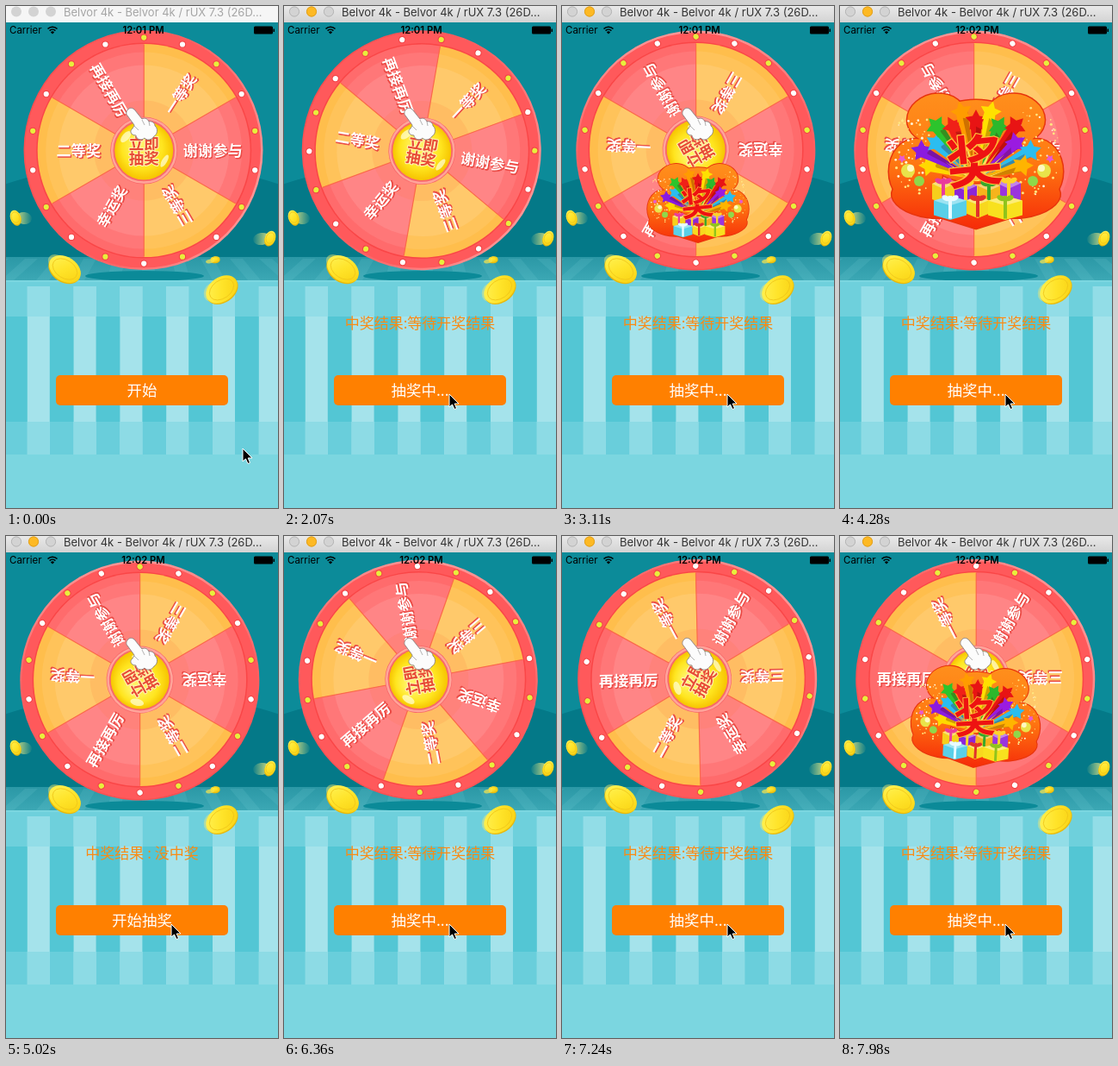
Animation, 316 px wide and 582 px high, one loop 8 s. Source, as an HTML page with a canvas:

```html
<!DOCTYPE html>
<html lang="zh">
<head>
<meta charset="utf-8">
<title>幸运转盘</title>
<style>
  html, body { margin: 0; width: 100%; height: 100%; overflow: hidden; }
  canvas { display: block; }
</style>
</head>
<body>
<canvas id="stage" width="316" height="582"></canvas>
<script>
const c = document.getElementById('stage').getContext('2d');
const TAU = Math.PI * 2, RAD = Math.PI / 180, LOOP = 8000;
const CJK = '"Noto Sans CJK SC", "Noto Sans CJK", sans-serif';

// Bursts of change: first step, last step, number of steps
const BURSTS = [[150, 880, 6], [2070, 3110, 8], [3260, 4280, 8],
  [4420, 5020, 5], [6360, 7390, 8], [7540, 7980, 4]];

function snap(t) {
  let s = 0;
  for (const [a, b, n] of BURSTS)
    for (let i = 0; i < n; i++) {
      const x = a + (b - a) * i / (n - 1);
      if (x <= t + 3) s = x;
    }
  return s;
}

const clamp = x => Math.max(0, Math.min(1, x));

// Ease-in-out, cubic-bezier(.42, 0, .58, 1)
function ease(x) {
  let lo = 0, hi = 1;
  for (let i = 0; i < 24; i++) {
    const u = (lo + hi) / 2, v = 1 - u;
    if (1.26 * v * v * u + 1.74 * v * u * u + u * u * u < x) lo = u; else hi = u;
  }
  return lo * lo * (3 - 2 * lo);
}

function rect(x, y, w, h, fill) { c.fillStyle = fill; c.fillRect(x, y, w, h); }

function oval(x, y, rx, ry, fill, rot = 0) {
  c.beginPath();
  c.ellipse(x, y, rx, ry, rot * RAD, 0, TAU);
  c.fillStyle = fill;
  c.fill();
}

const disc = (x, y, r, fill) => oval(x, y, r, r, fill);

function ring(x, y, r, width, stroke) {
  c.beginPath();
  c.arc(x, y, r, 0, TAU);
  c.lineWidth = width;
  c.strokeStyle = stroke;
  c.stroke();
}

function poly(pts, fill) {
  c.beginPath();
  for (let i = 0; i < pts.length; i += 2) c.lineTo(pts[i], pts[i + 1]);
  c.closePath();
  c.fillStyle = fill;
  c.fill();
}

function text(s, x, y, font, fill, align = 'center') {
  c.font = font;
  c.textAlign = align;
  c.textBaseline = 'alphabetic';
  c.fillStyle = fill;
  c.fillText(s, x, y);
}

function at(x, y, deg, draw, scale = 1) {
  c.save();
  c.translate(x, y);
  c.rotate(deg * RAD);
  c.scale(scale, scale);
  draw();
  c.restore();
}

function linear(x0, y0, x1, y1, ...stops) {
  const g = c.createLinearGradient(x0, y0, x1, y1);
  stops.forEach((s, i) => g.addColorStop(i / (stops.length - 1), s));
  return g;
}

function coin(x, y, rx, ry, deg) {
  at(x, y, deg, () => {
    oval(0, 1.5, rx, ry, '#e8b90c');
    oval(0, 0, rx, ry, linear(-rx, -ry, rx, ry, '#fff45c', '#ffe42a', '#f8cf10'));
    c.beginPath();
    c.ellipse(0, 0, rx * .78, ry * .75, 0, 0, TAU);
    c.lineWidth = .8;
    c.strokeStyle = '#f0c61a';
    c.stroke();
  });
}

function backdrop() {
  rect(0, 19, 316, 300, '#0c8b99');
  c.save();
  c.beginPath();
  c.rect(0, 19, 316, 273);
  c.clip();
  oval(158, 300, 260, 118, '#047988');
  c.restore();

  // Floor with converging boards
  rect(0, 291, 316, 28, linear(0, 291, 0, 319, '#2b98a6', '#3ca8b5'));
  for (let i = -8; i < 9; i++) {
    const x = 158 + i * 34;
    poly([x, 293, x + 15, 293, x + 15 + i * 7, 318, x + i * 7, 318], 'rgba(130,210,220,.14)');
  }
  oval(161, 313, 69, 6, '#0b8a98');

  // Fence
  rect(0, 318, 316, 264, '#7bd6e0');
  rect(0, 320, 316, 40, '#6ed0dc');
  rect(0, 360, 316, 122, '#53c6d4');
  rect(0, 482, 316, 38, '#69cedb');
  for (let i = 0; i < 6; i++) {
    const x = 24.8 + i * 53.8;
    rect(x, 325, 26, 195, '#a5e3eb');
    rect(x, 325, 26, 35, '#92dde7');
    rect(x, 482, 26, 38, '#8ddbe5');
  }

  // Coins with faint trails
  oval(21, 246, 9, 7, linear(12, 0, 31, 0, 'rgba(250,240,130,.8)', 'rgba(250,240,130,0)'), 8);
  coin(11, 245, 6, 8.5, -20);
  oval(297, 270, 10, 7, linear(305, 0, 286, 0, 'rgba(250,240,130,.8)', 'rgba(250,240,130,0)'), -8);
  coin(307, 269, 6, 8.5, 22);
  coin(243, 293.5, 5.5, 3.3, -5);
  oval(237, 296, 5, 2.2, 'rgba(240,225,80,.75)', -10);
  oval(60, 298, 12, 9, 'rgba(245,232,110,.45)', 35);
  oval(239, 332, 9, 11, 'rgba(245,232,110,.45)', 20);
  coin(68.5, 305, 20, 14, 33);
  coin(250.5, 328.5, 20, 14, -35);
}

// Label, direction, radius, text angle
const PRIZES = [['一等奖', -57, 78, -57], ['谢谢参与', 0, 80, 0], ['三等奖', 59, 75, 240],
  ['幸运奖', 120, 75, -60], ['二等奖', 180, 76, 0], ['再接再厉', 240, 81, 60]];

function label(s, y, size, fill, edge, shift = 0, width = 1.2) {
  const font = `bold ${size}px ${CJK}`;
  c.font = font;
  c.textAlign = 'center';
  c.lineJoin = 'round';
  c.lineWidth = width;
  c.strokeStyle = edge;
  c.strokeText(s, shift, y + shift);
  if (shift) text(s, shift, y + shift, font, edge);
  text(s, 0, y, font, fill);
}

function wheel(deg) {
  at(157.6, 168.4, deg, () => {
    c.translate(2.6, -.8);
    disc(-.7, -.7, 139, linear(-139, -60, 139, 60, '#f94d4f', '#fd6163', '#ff9a9a'));
    disc(-1.2, -1, 137, '#ff595b');
    disc(0, 0, 125, '#fa4647');
    const edge = i => (i * 60 - 90) * RAD;
    for (let i = 0; i < 6; i++) {
      c.beginPath();
      c.moveTo(0, 0);
      c.arc(0, 0, 123.5, edge(i), edge(i + 1));
      c.fillStyle = i % 2 ? '#ff6b6c' : '#ffbe4c';
      c.fill();
    }
    disc(0, 0, 114, 'rgba(255,255,255,.08)');
    disc(0, 0, 99, 'rgba(255,255,255,.1)');
    disc(0, 0, 58, 'rgba(255,110,50,.13)');
    c.beginPath();
    for (let i = 0; i < 6; i++) {
      c.moveTo(0, 0);
      c.lineTo(123 * Math.cos(edge(i)), 123 * Math.sin(edge(i)));
    }
    c.lineWidth = 1.2;
    c.strokeStyle = '#fb6a4a';
    c.stroke();

    for (let i = 0; i < 18; i++) {
      const a = (i * 20 - 90) * RAD, x = 131 * Math.cos(a), y = 131 * Math.sin(a);
      disc(x, y, 4.1, '#f04446');
      disc(x, y, 3.1, i % 2 ? '#fff' : '#e9ee3c');
    }
    for (const [s, dir, r, turn] of PRIZES)
      at(r * Math.cos(dir * RAD), r * Math.sin(dir * RAD), turn,
        () => label(s, 6.5, 17.2, '#fff', '#ea4a44', 1.1, .8));

    // Hub
    disc(0, 0, 39, '#f8686a');
    ring(0, 0, 37, 2.5, '#ffa49b');
    const g = c.createRadialGradient(-6, -10, 4, 0, 0, 34);
    g.addColorStop(0, '#fff46a');
    g.addColorStop(.65, '#ffe51f');
    g.addColorStop(1, '#f6c400');
    disc(0, 0, 34, g);
    oval(24, 12, 3, 8, 'rgba(255,255,220,.7)', 30);
    oval(-21, -16, 4, 8, 'rgba(255,255,220,.7)', 42);
    label('立即', -1.5, 17.5, '#e84a36', '#fff3b0', 0, 2.2);
    label('抽奖', 15.5, 17.5, '#e84a36', '#fff3b0', 0, 2.2);
  });
}

function hand() {
  c.beginPath();
  c.moveTo(141, 121);
  c.bezierCurveTo(143, 117, 148, 118, 150, 121);
  c.lineTo(158, 131);
  c.bezierCurveTo(161, 129, 165, 131, 166, 134);
  c.bezierCurveTo(170, 133, 173, 136, 173, 139);
  c.bezierCurveTo(177, 142, 176, 149, 172, 151);
  c.bezierCurveTo(169, 156, 163, 156, 161, 153);
  c.bezierCurveTo(157, 157, 151, 154, 151, 150);
  c.bezierCurveTo(145, 150, 143, 145, 147, 142);
  c.bezierCurveTo(148, 140, 149, 139, 149, 138);
  c.lineTo(141, 127);
  c.bezierCurveTo(139, 125, 140, 122, 141, 121);
  c.closePath();
  c.fillStyle = '#fcfcfc';
  c.fill();
  c.lineWidth = .9;
  c.strokeStyle = '#8a8080';
  c.stroke();
  c.beginPath();
  c.moveTo(158, 132); c.lineTo(161, 138);
  c.moveTo(166, 134); c.lineTo(167, 139);
  c.moveTo(149, 139); c.lineTo(154, 144);
  c.strokeStyle = '#aaa';
  c.stroke();
}

function star(x, y, r, deg, fill) {
  const pts = [];
  for (let i = 0; i < 10; i++) {
    const a = (i * 36 + deg) * RAD, q = i % 2 ? r * .52 : r;
    pts.push(x + q * Math.cos(a), y + q * Math.sin(a));
  }
  poly(pts, fill);
}

function gift(x, y, w, h, fill, ribbon) {
  poly([x, y - h, x + w, y - h * .6, x + w, y + h * .6, x, y + h, x - w, y + h * .6, x - w, y - h * .6], fill);
  poly([x, y - h, x + w, y - h * .6, x, y - h * .2, x - w, y - h * .6], 'rgba(255,255,255,.4)');
  rect(x - 2, y - h, 4, h * 1.9, ribbon);
  oval(x - 5, y - h * .8, 5, 3, ribbon, 25);
  oval(x + 5, y - h * .8, 5, 3, ribbon, -25);
}

// Rounded backing of the burst, widened by grow
function backing(grow, fill) {
  for (const s of [-1, 1]) {
    oval(s * 46, -49, 34 + grow, 28 + grow, fill, s * 12);
    oval(s * 70, 13, 31 + grow, 38 + grow, fill);
    oval(s * 54, 44, 44 + grow, 22 + grow, fill, s * -8);
  }
  oval(0, -22, 66 + grow, 48 + grow, fill);
  poly([-60, 50, 60, 50, 48, 64 + grow, 0, 79 + grow, -48, 64 + grow], fill);
}

const RAYS = ['#ffd800', '#8a1be0', '#2bbdf0', '#2cc42c', '#f02018', '#ff9c00', '#e81414',
  '#ffe000', '#2cb82c', '#e81414', '#9a1be0', '#2bbdf0', '#ffb400'];

// Full-size burst, 206 wide
function burst() {
  backing(1.5, '#e8340c');
  backing(0, linear(0, -78, 0, 78, '#ff8f1c', '#ff7a12', '#f62c08'));

  let seed = 7;
  const rnd = () => (seed = seed * 16807 % 2147483647) / 2147483647;
  for (let i = 0; i < 150; i++) {
    const s = i % 2 ? 1 : -1, a = rnd() * TAU, r = Math.sqrt(rnd());
    disc(s * 66 + 31 * r * Math.cos(a), -10 + 52 * r * Math.sin(a), .6 + rnd(), i % 3 ? '#ffe680' : '#fff6dc');
  }
  for (const s of [-1, 1]) {
    disc(s * 79, 12, 8, '#e9e34a');
    disc(s * 76, 9, 4, '#fff9c0');
    star(s * 86, -2, 5, 20, '#e85ad0');
    disc(s * 66, 24, 6, '#8fd84a');
  }

  RAYS.forEach((col, i) => {
    const a = (-178 + i * 176 / 12) * RAD, r = i % 2 ? 66 : 54;
    const x = r * Math.cos(a), y = 8 + r * Math.sin(a);
    const nx = -Math.sin(a) * 7, ny = Math.cos(a) * 7;
    poly([0, 22, x + nx, y + ny, x - nx, y - ny], col);
    poly([0, 22, x + nx, y + ny, x, y], 'rgba(80,0,0,.28)');
    star(x, y, 13, a / RAD, col);
  });
  for (let i = 0; i < 14; i++) {
    const a = (-185 + i * 190 / 13) * RAD;
    poly([-3, 24, 3, 24, 36 * Math.cos(a), 8 + 36 * Math.sin(a)], i % 2 ? '#ffe25a' : '#ff9a1c');
  }

  gift(-38, 36, 13, 15, '#f6cf1c', '#e93c9c');
  gift(38, 36, 14, 16, '#9a35dd', '#ffd42a');
  gift(-12, 38, 13, 14, '#8c25d8', '#ffd42a');
  gift(15, 38, 13, 14, '#f6b41c', '#36a82c');
  gift(-30, 55, 19, 14, '#59cfe8', '#e8fbff');
  gift(2, 54, 13, 13, '#f8d81e', '#e2312c');
  gift(34, 55, 20, 14, '#f8e11e', '#8fc41c');

  at(-2, 2, -6, () => {
    const font = `bold 65px ${CJK}`;
    c.font = font;
    c.textAlign = 'center';
    c.lineJoin = 'round';
    c.lineWidth = 2.5;
    c.strokeStyle = '#ffc23a';
    c.strokeText('奖', 0, 23);
    text('奖', 0, 23, font, '#ee1212');
  });
}

function prize(t) {
  const start = t >= 7385 ? 7390 : 3110;
  if (t < start - 5 || (start === 3110 && t > 5010)) return;
  const n = Math.max(0, t - start) / 585, w = 120 + 21 * n + 11 * n * n;
  at(158, 228 - .57 * (w - 120), n * 360, burst, w / 206);
}

function topBars(t) {
  const active = t >= 2069;
  rect(0, 0, 316, 19, active ? linear(0, 0, 0, 19, '#e9e9e9', '#d3d3d3') : '#f6f6f6');
  for (let i = 0; i < 3; i++) {
    const x = 12 + i * 20, lit = active && i === 1;
    disc(x, 6.5, 6, lit ? '#fdb924' : '#d3d3d3');
    if (active) ring(x, 6.5, 5.6, .9, lit ? '#dc9b1c' : '#b0b0b0');
  }
  text('Belvor 4k - Belvor 4k / rUX 7.3 (26D...', 67, 12, '13px Inter, sans-serif', active ? '#333' : '#a5a5a5', 'left');

  text('Carrier', 4, 32, '11.5px Inter, sans-serif', '#000', 'left');
  c.strokeStyle = '#000';
  c.lineWidth = 1.6;
  for (const r of [4.8, 7.8]) {
    c.beginPath();
    c.arc(54, 32, r, -135 * RAD, -45 * RAD);
    c.stroke();
  }
  c.beginPath();
  c.moveTo(54, 32.5);
  c.arc(54, 32.5, 3, -135 * RAD, -45 * RAD);
  c.fillStyle = '#000';
  c.fill();
  text(t < 3690 ? '12:01 PM' : '12:02 PM', 159.5, 32, '600 11.3px Inter, sans-serif', '#000');
  c.beginPath();
  c.roundRect(288, 23.5, 22, 9, 1.5);
  c.fill();
  rect(310.5, 26.5, 1.5, 3.5, '#000');
}

function controls(t) {
  const idle = t < 2069, done = t > 5010 && t < 6355;
  const result = idle ? '' : done ? '中奖结果 : 没中奖' : '中奖结果:等待开奖结果';
  text(result, 158, 374, `17px ${CJK}`, '#f98a14');
  c.beginPath();
  c.roundRect(58, 428, 200, 35, 5);
  c.fillStyle = '#ff8000';
  c.fill();
  text(idle ? '开始' : done ? '开始抽奖' : '抽奖中...', 158, 452, `17.5px ${CJK}`, '#fff');
}

function cursor(t) {
  const step = t < 150 ? 0 : clamp((t - 4) / 876), p = step * (2 - step);
  at(275 - 83 * p, 513 - 63 * p, 0, () => {
    poly([0, 0, 0, 15, 3.5, 12, 6, 17.5, 8.5, 16.5, 6.2, 11, 11, 11], '#000');
    c.lineWidth = 1;
    c.lineJoin = 'miter';
    c.strokeStyle = '#fff';
    c.stroke();
  });
}

function draw(t) {
  const spin = 1320 * ease(clamp((t - 2008) / 1000)) + 1140 * ease(clamp((t - 6267) / 1000));
  backdrop();
  wheel(spin);
  hand();
  prize(t);
  topBars(t);
  controls(t);
  cursor(t);
}

function tick() {
  draw(snap(performance.now() % LOOP));
  requestAnimationFrame(tick);
}
tick();
</script>
</body>
</html>
```
